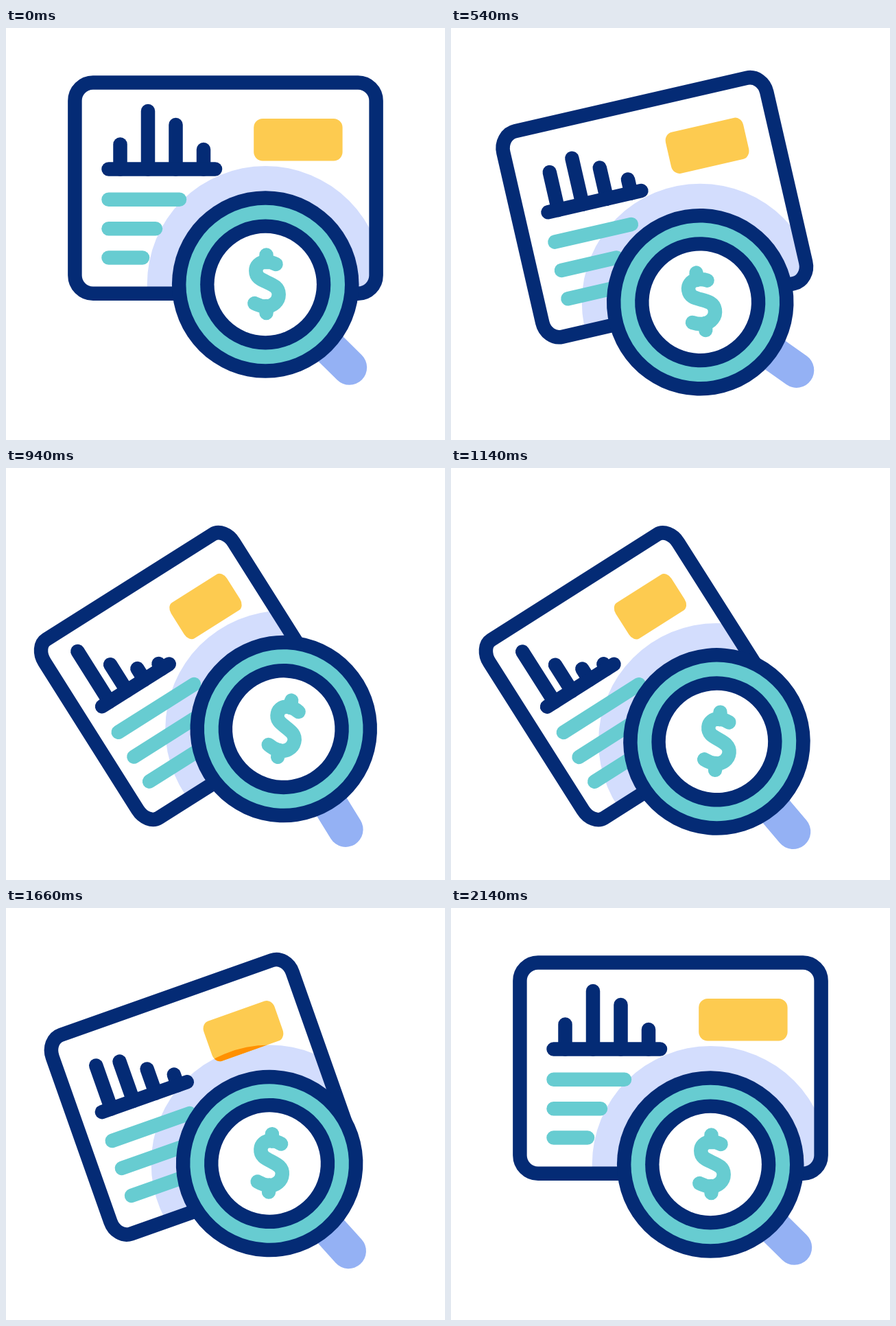
An HTML page with a canvas for the animation above (2400 ms loop, 640 by 600 pixels).

```html
<!DOCTYPE html>
<html lang="en">
<head>
<meta charset="utf-8">
<title>Report under a magnifier</title>
<style>
  html, body { margin: 0; width: 100%; height: 100%; overflow: hidden; background: #fff; }
  canvas { display: block; }
</style>
</head>
<body>
<canvas id="stage" width="640" height="600"></canvas>
<script>
const ctx = document.getElementById('stage').getContext('2d');
const LOOP = 2400, STEP = 20, STROKE = 20.5;
const NAVY = '#042b75', TEAL = '#67ccd1', LILAC = '#d3ddfd',
      BLUE = '#94b1f4', YELLOW = '#fdcb50', ORANGE = '#ff9000';

const LENS = { x: 378.2, y: 373.5 };
const PIVOT = { x: 478.2, y: 473.5 };

// Card parts: x from card centre, then height or length at rest and when turned
const BARS = [[-153.5, 36, 87], [-113, 84.5, 45], [-72.5, 64.5, 19], [-32, 28.5, 8.5]];
const ROWS = [[16.6, 103.5, 130.5], [59, 68.5, 103.5], [101.4, 49.5, 87.5]];

const cardShape = new Path2D();
cardShape.roundRect(-219.6, -153.6, 439.2, 307.2, 26.5);
const badgeShape = new Path2D();
badgeShape.roundRect(41.2, -101.2, 129.4, 61.6, 13);
const dollar = new Path2D(
  'M393.5 344Q387 340.5 379.5 340.5C369 340.5 364.3 347 364.3 353.5' +
  'C364.3 363 371 366 380 370C390 374.5 397.7 378 397.7 388' +
  'C397.7 398 389 405.5 379.5 405.5Q371 405.5 362.3 401' +
  'M379.5 330.5V341M379.5 405V415');

// [time, value] keys of the magnifier's swing (degrees) and bob (pixels)
const SWING = [[80, 0], [120, -5], [400, -18], [680, 2.4], [940, 13.7], [1000, 15.3],
               [1340, -7.2], [1660, 3.3], [1770, 4.5], [2000, 0.8], [2140, 0]];
const BOB = [[80, 0], [120, 13.5], [400, 50.7], [680, -31.9], [940, 27.4], [1040, 52],
             [1340, -10.3], [1660, 4.1], [1780, 15], [2000, 4], [2140, 0]];

const mix = (a, b, k) => a + (b - a) * k;

function ease(k) {
  k = Math.min(1, Math.max(0, k));
  return k < 0.5 ? 4 * k ** 3 : 1 - 4 * (1 - k) ** 3;
}

// Smooth curve through the keys, flat at both ends
function curve(keys, t) {
  const last = keys.length - 1;
  if (t <= keys[0][0]) return keys[0][1];
  if (t >= keys[last][0]) return keys[last][1];
  const slope = i => i < 1 || i >= last ? 0
    : (keys[i + 1][1] - keys[i - 1][1]) / (keys[i + 1][0] - keys[i - 1][0]);
  const i = keys.findIndex(key => key[0] > t) - 1;
  const [t0, a] = keys[i], [t1, b] = keys[i + 1];
  const d = t1 - t0, k = (t - t0) / d;
  return mix(a, b, k * k * (3 - 2 * k)) +
    d * k * (1 - k) * (slope(i) * (1 - k) - slope(i + 1) * k);
}

function placed(shape, matrix) {
  const path = new Path2D();
  path.addPath(shape, matrix);
  return path;
}

function disc(c, r, color) {
  ctx.fillStyle = color;
  ctx.beginPath();
  ctx.arc(c.x, c.y, r, 0, 2 * Math.PI);
  ctx.fill();
}

function line(x, y, dx, dy, color, width = STROKE) {
  ctx.strokeStyle = color;
  ctx.lineWidth = width;
  ctx.beginPath();
  ctx.moveTo(x, y);
  ctx.lineTo(x + dx, y + dy);
  ctx.stroke();
}

function clipped(path, paint) {
  ctx.save();
  ctx.clip(path);
  paint();
  ctx.restore();
}

function drawCard(p, lens) {
  const squeeze = mix(1, 0.742, p);
  const turn = new DOMMatrix().translate(320 - 58.2 * p, 233.2 + 70.1 * p).rotate(-32.4 * p);
  const flat = turn.scale(squeeze, 1);
  const card = placed(cardShape, flat), badge = placed(badgeShape, flat);

  clipped(card, () => disc(lens, 172.5, LILAC));
  ctx.fillStyle = YELLOW;
  ctx.fill(badge);
  clipped(badge, () => disc(lens, 172.5, ORANGE));

  ctx.setTransform(turn);
  const left = -170.5 * squeeze;
  for (const [y, a, b] of ROWS) line(left, y, mix(a, b, p), 0, TEAL);
  for (const [x, a, b] of BARS) line(x * squeeze, -27.8, 0, -mix(a, b, p), NAVY);
  line(left, -27.8, 155.5 * squeeze, 0, NAVY);
  ctx.resetTransform();

  ctx.strokeStyle = NAVY;
  ctx.lineWidth = STROKE;
  ctx.stroke(card);
}

function drawLens(matrix) {
  ctx.setTransform(matrix);
  line(LENS.x, LENS.y, 122.5, 120.8, BLUE, 51);
  disc(LENS, 136.3, NAVY);
  disc(LENS, 115.8, TEAL);
  disc(LENS, 95.1, NAVY);
  disc(LENS, 74.7, '#fff');
  ctx.strokeStyle = TEAL;
  ctx.lineWidth = STROKE;
  ctx.stroke(dollar);
  ctx.resetTransform();
}

function draw(t) {
  if (t < 100) t = 0;
  else if (t > 120 && t < 400) t = 120; // the motion pauses, then jumps on

  const p = ease((t - 116) / 914) - ease((t - 1236) / 914);
  const matrix = new DOMMatrix().translate(PIVOT.x, PIVOT.y + curve(BOB, t))
    .rotate(curve(SWING, t)).translate(-PIVOT.x, -PIVOT.y);

  ctx.fillStyle = '#fff';
  ctx.fillRect(0, 0, 640, 600);
  drawCard(p, matrix.transformPoint(LENS));
  drawLens(matrix);
}

ctx.lineCap = ctx.lineJoin = 'round';
const start = performance.now();

function tick() {
  const t = (performance.now() - start) % LOOP;
  draw(Math.floor(t / STEP) * STEP);
  requestAnimationFrame(tick);
}
tick();
</script>
</body>
</html>
```
